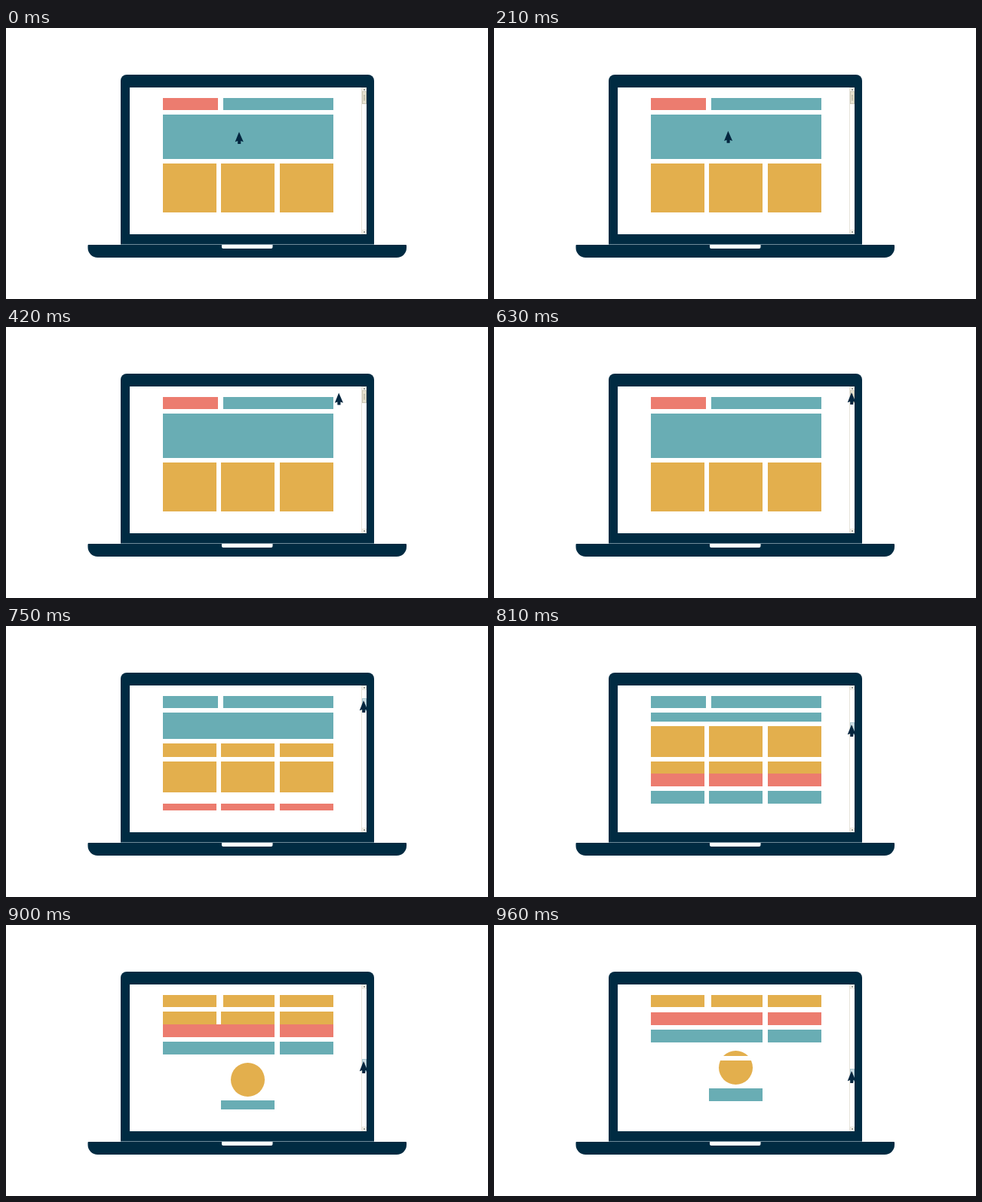
Write an HTML page with a canvas that moves like this. It is 639 by 360 pixels and loops after 1.83 s.

```html
<!DOCTYPE html>
<html lang="en">
<head>
<meta charset="utf-8">
<title>Scrolling a page on a laptop</title>
<style>
html, body { margin: 0; width: 100%; height: 100%; overflow: hidden; background: #fff; }
canvas { display: block; }
</style>
</head>
<body>
<canvas id="stage" width="639" height="360"></canvas>
<script>
const ctx = document.getElementById('stage').getContext('2d');
const NAVY = '#002b42', TEAL = '#69adb4', GOLD = '#e3af4d', CORAL = '#ec7c6f', WHITE = '#fff';
const LOOP = 1830, STEP = 30, SCROLL = 135;
const COLUMNS = [[208, 279], [285, 356], [363, 434]];

// Rectangle given by its four edges
function box(color, left, top, right, bottom) {
  ctx.fillStyle = color;
  ctx.fillRect(left, top, right - left, bottom - top);
}

function rounded(color, x, y, w, h, radii) {
  ctx.fillStyle = color;
  ctx.beginPath();
  ctx.roundRect(x, y, w, h, radii);
  ctx.fill();
}

function ease(t, from, to) {
  const p = Math.min(1, Math.max(0, (t - from) / (to - from)));
  return p * p * (3 - 2 * p);
}

// Piecewise linear value through [time, value] points
function track(t, points) {
  for (let i = 1; i < points.length; i++) {
    const [t0, v0] = points[i - 1], [t1, v1] = points[i];
    if (t < t1) return v0 + (v1 - v0) * Math.max(0, (t - t0) / (t1 - t0));
  }
  return points[points.length - 1][1];
}

function laptop() {
  rounded(NAVY, 152, 62, 336, 226, [8, 8, 0, 0]);
  box(WHITE, 164, 79, 478, 274);
  box('#6f8c9b', 152, 287, 488, 288);
  rounded(NAVY, 108.5, 288, 422.5, 17, [1, 1, 13, 13]);
  rounded(WHITE, 286, 288, 67.5, 5, [0, 0, 2, 2]);
}

function page(upper, lower) {
  ctx.save();
  ctx.beginPath();
  ctx.rect(208, 93, 226, 152);
  ctx.clip();

  ctx.save();
  ctx.translate(0, -upper);
  box(CORAL, 208, 93, 281, 109);
  box(TEAL, 288, 93, 434, 109);
  box(TEAL, 208, 115, 434, 174);
  for (const [l, r] of COLUMNS) box(GOLD, l, 180, r, 245);
  ctx.restore();

  ctx.save();
  ctx.translate(0, -lower);
  box(WHITE, 208, 251, 434, 420);
  for (const [color, top] of [[CORAL, 251], [TEAL, 274]]) {
    box(color, 208, top, 356, top + 17);
    box(color, 363, top, 434, top + 17);
  }
  ctx.fillStyle = GOLD;
  ctx.beginPath();
  ctx.arc(320.5, 324.5, 22.5, 0, 2 * Math.PI);
  ctx.fill();
  box(TEAL, 285, 352, 356, 369);
  ctx.restore();

  // Fixed white gutters
  box(WHITE, 208, 109, 434, 115);
  box(WHITE, 208, 174, 434, 180);
  box(WHITE, 281, 93, 288, 109);
  box(WHITE, 279, 180, 285, 245);
  box(WHITE, 356, 180, 363, 245);
  ctx.restore();
}

function scrollbar(dy, dragging) {
  box('#e6e3da', 471, 79, 472, 274);
  for (const top of [79, 268]) {
    box('#e9e6dc', 472, top, 478, top + 6);
    box('#fbfaf6', 473, top + 1, 477, top + 5);
    box('#9a9a90', 474, top + 2, 476, top + 4);
  }
  const top = 84 + dy;
  box(dragging ? '#a9c8d2' : '#c9c6b4', 472, top, 478, top + 17);
  box(dragging ? '#cfe0e6' : '#e6e2d0', 473, top + 1, 477, top + 16);
  for (let y = top + 5; y < top + 13; y += 2) box('#a5a394', 474, y, 476, y + 1);
}

function pointer(x, y) {
  ctx.save();
  ctx.translate(x, y);
  ctx.fillStyle = '#04263f';
  ctx.fill(new Path2D('M0 0L5.8 13.3L2.3 12V16H-1.8V12L-5.3 13.3Z'));
  ctx.restore();
}

function draw(now) {
  const t = Math.floor(now % LOOP / STEP) * STEP;
  const move = ease(t, 193, 511);
  const drag = ease(t, 695, 957);
  const upper = track(t, [[690, 0], [750, 24], [840, 58], [960, SCROLL]]);
  const dy = Math.round(107 * drag);

  box(WHITE, 0, 0, 639, 360);
  laptop();
  page(Math.round(upper), Math.round(SCROLL * drag));
  scrollbar(dy, drag > 0);
  pointer(309 + 165 * move, 87 + 51 * (1 - move) ** 3 + dy);
}

let start;
function tick(now) {
  start ??= now;
  draw(now - start);
  requestAnimationFrame(tick);
}
requestAnimationFrame(tick);
</script>
</body>
</html>
```
